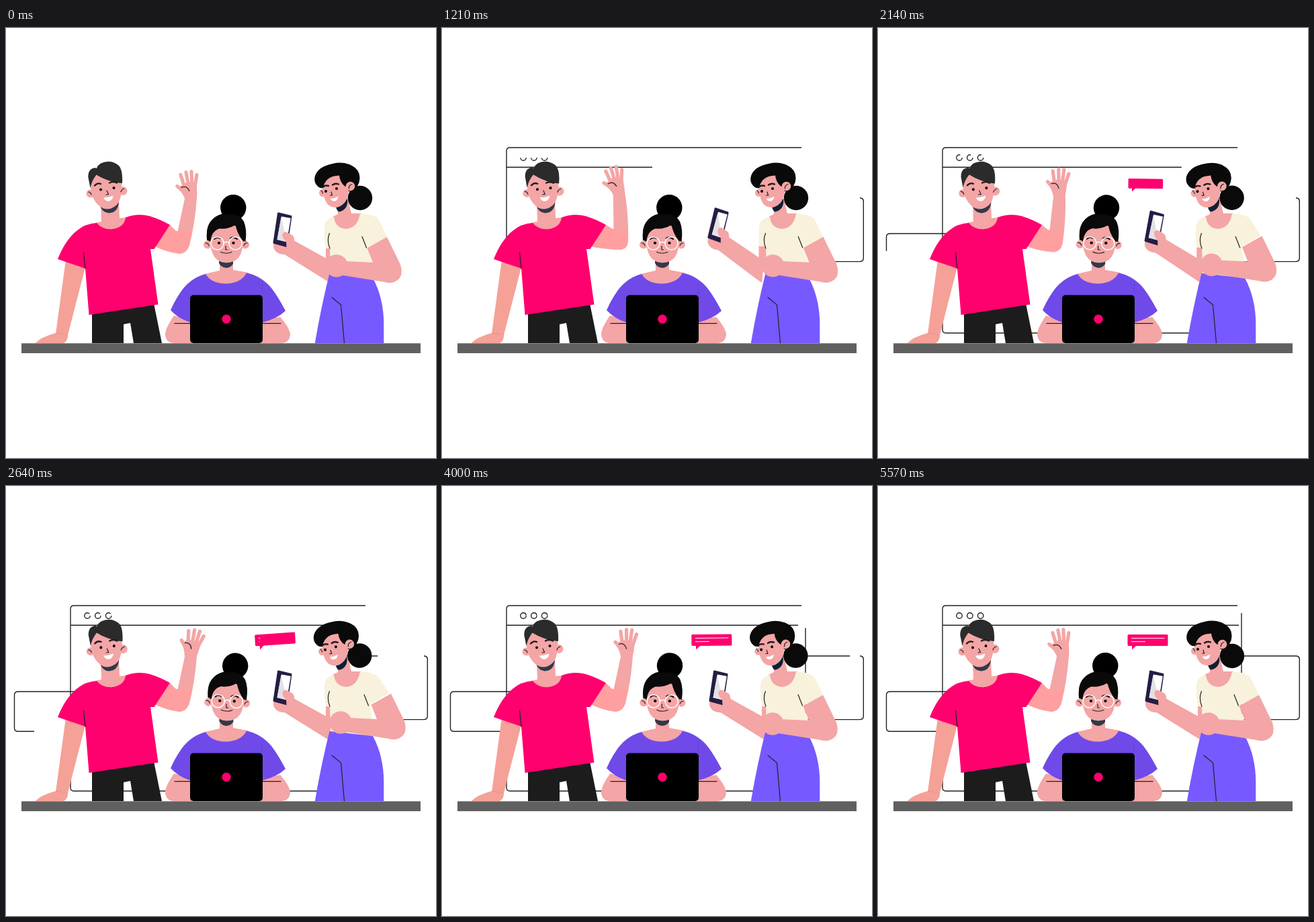
These frames come from a looping animation (640 px wide and 640 px high, 6.07 s). An HTML page:

```html
<!DOCTYPE html>
<html lang="en">
<head>
<meta charset="utf-8">
<title>Team at a desk</title>
<style>
  html, body { margin: 0; height: 100%; overflow: hidden; background: #fff; }
  svg { display: block; width: 100%; height: 100%; }
  .skin { fill: #f4a5a5; }
  .warm { fill: #f5a197; }
  .bright { fill: #ff9f9f; }
  .ink { fill: #0a0a0a; }
  .shade { fill: #2e3a4a; }
  .line, .frame { fill: none; stroke: #222; stroke-width: 1.2; stroke-linecap: round; }
  .frame { stroke-width: 1.4; stroke-linecap: butt; }
  .brow { fill: none; stroke: #1d1d22; stroke-width: 2.4; stroke-linecap: round; }
  .finger { fill: none; stroke: #f4a5a5; stroke-width: 5.2; stroke-linecap: round; }
  .text { stroke: #fff; stroke-width: 1; }
</style>
</head>
<body>
<svg viewBox="0 0 640 640">
  <g class="frame">
    <path class="draw" pathLength="1" d="M535,178H101Q96,178 96,183V449Q96,454 101,454H536Q541,454 541,449V189"/>
    <path class="draw" pathLength="1" d="M96,207.3H537"/>
    <circle class="draw" pathLength="1" cx="121" cy="193" r="4.2"/>
    <circle class="draw" pathLength="1" cx="136.800" cy="193" r="4.2"/>
    <circle class="draw" pathLength="1" cx="152.600" cy="193" r="4.2"/>
    <path id="leftBox" d="M106,306H18Q12.500,306 12.500,311V360Q12.500,365.300 18,365.300H112"/>
    <path id="rightBox" pathLength="1" d="M622,253Q627.300,253 627.300,258V342Q627.300,347.600 622,347.600H508Q503,347.600 503,342V258Q503,253 508,253H622"/>
  </g>

  <g id="bubble">
    <path fill="#ff006e" d="M373,221H430Q431.500,221 431.500,222.500V236.500Q431.500,238 430,238H384L378,243.500V238H373Q371.500,238 371.500,236.500V222.500Q371.500,221 373,221Z"/>
    <path id="text1" class="text"/>
    <path id="text2" class="text"/>
  </g>

  <!-- waving man -->
  <g id="forearm">
    <path class="skin" d="M-8,-18L-7,-74H10Q15,-40 13,0Q10,14 -2,14L-10,6Z"/>
    <g id="hand">
      <path class="skin" d="M-14,-16Q-8,-22 0,-21Q8,-20 9,-14Q10,-5 9,5L-8,5Q-12,-6 -21,-13Z"/>
      <path class="finger" d="M9,-32L6,-13M1,-37L2,-14M-7,-36L-3,-14M-15,-32L-9,-13M-20,-15L-8,-5"/>
      <path class="line" d="M-14,-13Q-6,-17 -2,-8"/>
    </g>
  </g>
  <path id="upperArm" class="bright"/>
  <path class="warm" d="M89,345L74,455L92,457L118,356Z"/>
  <path class="warm" d="M44,468.500Q52,460 74,454L92,457Q92.500,465 86,469H45Z"/>
  <path fill="none" stroke="#e08d88" stroke-width=".7" d="M74,454L92,457"/>
  <path fill="#1c1c1c" d="M128,422V469H175V441L185,439L190,469H232L220,410Z"/>
  <path class="skin" d="M141,262L142,288L133,290Q138,302 156,301Q174,300 180,282L169,283L168,258Z"/>
  <path fill="#ff006e" d="M135,290Q118,291 105,302Q88,316 77,344L118,358L123.500,427L226.500,411.500L215,329H220.500L244,293Q230,285 214,280Q196,275 178,282Q176,298 156,299.500Q142,299.500 135,290Z"/>
  <path class="line" d="M115.500,334L118,358"/>
  <g id="manHead">
    <path class="shade" d="M139,262L168,258Q167,275 153,275.500Q143,275 139,262Z"/>
    <circle class="skin" cx="125.500" cy="246.500" r="6"/>
    <circle class="skin" cx="174" cy="242.500" r="6.500"/>
    <path class="skin" d="M125,232Q130,215 150,216L172,224Q174,255 164,264Q152,274 140,266Q130,258 127,245Z"/>
    <path class="line" d="M122.500,244Q126,244 127,248M171,244Q172,240 176,239"/>
    <path fill="#2b2b2b" d="M125.500,238L122.300,222Q122,209 133,208L137,211L135,218Q128,226 125.500,238ZM134.500,218.500Q132,207 141,201.500Q155,195 167,204Q174,210 173,231Q160,230 150,226Q142,223 134.500,218.500Z"/>
    <path class="brow" d="M132,234.500Q136,230 141,232M154,230.500Q159,227.500 165,230.500"/>
    <ellipse class="eye a" cx="141" cy="240.500" rx="2"/>
    <ellipse class="eye a" cx="160.500" cy="238" rx="2"/>
    <path class="line" d="M150,242L152.500,247.500L149,248"/>
    <path fill="#fff" d="M145,252.500Q152,252.500 159.500,249.500Q159,257 152,258Q147,257.500 145,252.500Z"/>
  </g>

  <!-- woman with the laptop -->
  <path class="skin" d="M250,428Q237,447 237,456Q238,469 251,469H277V435Z"/>
  <path class="skin" d="M408,430Q422,446 423,456Q422,469 409,469H379V435Z"/>
  <path class="line" d="M251,439.700H275M381,439.700H409"/>
  <path class="skin" d="M318,340V361L296,366Q304,382 327,382Q351,382 360,364L338,360V340Z"/>
  <path fill="#704ae8" d="M297,366Q272,373 258,396Q251,406 245,420Q257,433 274,438H382Q403,433 416,421Q405,400 395,387Q380,369 358,364.500Q350,380 327,380.500Q305,380 297,366Z"/>
  <path fill="none" stroke="#6440d6" d="M381.500,379V398"/>
  <rect x="274" y="397.500" width="108" height="71.500" rx="5"/>
  <circle cx="328" cy="433.300" r="6.700" fill="#ff006e"/>
  <g id="midHead">
    <path class="shade" d="M317,343H338V351Q334,357 327.500,357Q320,356 317,350Z"/>
    <circle class="ink" cx="328" cy="305" r="29"/>
    <circle cx="338.300" cy="267.300" r="19.200"/>
    <circle class="skin" cx="300" cy="322.500" r="6"/>
    <circle class="skin" cx="356" cy="322.500" r="6"/>
    <path class="skin" d="M304,314Q304,292 328,292Q352,292 352.500,314Q354,349 328,349.500Q304,349 304,314Z"/>
    <path class="ink" d="M299,316Q296,286 318,279Q345,272 354,288Q359,300 356.500,318L352,316Q344,306 341.500,293Q330,300 318,298.500Q306,302 304.500,317Z"/>
    <path class="line" d="M297,320Q301,320 302,324M354,324Q355,320 359,320"/>
    <path class="brow" d="M310,314Q314,310 319,313M334,313Q339,310 344,314" stroke-width="2"/>
    <g fill="none" stroke="#fff" stroke-width="1.500">
      <circle cx="314.500" cy="320.500" r="9.600"/>
      <circle cx="341.500" cy="320.500" r="9.600"/>
      <path d="M324,320Q328,317 332,320"/>
    </g>
    <ellipse class="eye a" cx="317" cy="320" rx="2.200"/>
    <ellipse class="eye a" cx="338.500" cy="320" rx="2.200"/>
    <path class="line" d="M327,324.500V330H329.500M319.500,333.500Q328,337 336,333.500"/>
  </g>

  <!-- woman with the phone -->
  <path id="sleeveSkin" class="skin"/>
  <g id="phoneArm">
    <path class="skin" d="M428,316L484,347V380L477,376L408,333Z"/>
    <ellipse class="skin" cx="413" cy="324" rx="15" ry="13"/>
    <path fill="#241d45" stroke="#241d45" stroke-width="3" stroke-linejoin="round" d="M405.500,276L424,280.500L417.500,324.500L399,319.500Z"/>
    <path fill="#fff" d="M410,280.500L423.800,283L418,318.500L403.500,315Z"/>
    <path fill="#e3e1e4" d="M409.500,281L418,318.500L403.500,315Z"/>
    <path class="skin" d="M411.500,307Q414,301 420,305L427,309Q431,314 428,325L418,334L417,318Q411,313 411.500,307Z"/>
  </g>
  <path class="skin" d="M493,264L494,277L486,281Q488,301 507,301Q526,299 529,276L514,276L509,255Z"/>
  <path id="top" fill="#f8f1dc"/>
  <path class="line" d="M481.500,305.500Q477,316 482,328"/>
  <path id="fold" class="line" d="M530,310.500L536.500,327"/>
  <path fill="#7759ff" d="M481.500,365L546,372Q562,402 562.300,440V469H459.800Q469,415 481.500,365Z"/>
  <path class="line" d="M485,401L498.500,412L503.500,469"/>
  <g id="elbow" class="skin">
    <path d="M537.500,327.500L567,311L587,352Q593,372 578,378Q571,380.500 563,378L500,368L500,347L546,349Z"/>
    <circle cx="492" cy="354" r="16.700"/>
  </g>
  <g id="rightHead">
    <circle class="ink" cx="527" cy="253" r="18.200"/>
    <path fill="#0d2035" d="M490,262L508,254Q510,270 496,273.500Q492,273 490,262Z"/>
    <path class="ink" d="M466,237Q457,231 460,220Q465,206 486,202Q502,198 515,205Q527,211 526.500,224Q526,236 515,242L500,246Z"/>
    <circle class="skin" cx="471.500" cy="245.500" r="5.500"/>
    <path class="skin" d="M472,240Q473,222 496,218L509,232Q512,250 504,260Q494,271 482,265Q473,259 472,240Z"/>
    <path class="ink" d="M463,234Q460,218 478,212L504,210L517,228L505,236Q497,230 496,219.500Q482,221 474,224Q471,229 472,238Q466,239 463,234Z"/>
    <circle class="skin" cx="512.500" cy="235.500" r="6.800"/>
    <path class="line" d="M510.500,239Q510,234 515,232.500M469,242Q471,243 471.500,246"/>
    <path class="brow" d="M472,236.500Q475,233.500 480,235M486,233.500Q490,230.500 495,232.500"/>
    <ellipse class="eye b" cx="476" cy="243" rx="2"/>
    <ellipse class="eye b" cx="492" cy="239" rx="2"/>
    <path class="line" d="M484,244L485.500,249H482.500"/>
    <path fill="#fff" d="M482.500,254Q489,254 494.500,250.500Q494,257 488.500,258Q484,257.500 482.500,254Z"/>
  </g>

  <rect x="23" y="469.300" width="594" height="14.700" fill="#606060"/>
</svg>
<script>
const LOOP = 6070;
const $ = id => document.getElementById(id);
const all = selector => document.querySelectorAll(selector);
const clamp = v => Math.min(1, Math.max(0, v));
const smooth = v => v * v * (3 - 2 * v);
const set = (id, name, value) => $(id).setAttribute(name, value);

// Strong ease-out curve: cubic-bezier(.31, 0, .01, 1)
function ease(x) {
  let low = 0, high = 1;
  for (let i = 0; i < 20; i++) {
    const s = (low + high) / 2, r = 1 - s;
    if (3 * r * r * s * .31 + 3 * r * s * s * .01 + s ** 3 < x) low = s; else high = s;
  }
  return smooth(high);
}
const drawn = (t, start, end) => t <= start ? 0 : t >= end ? 1 : ease((t - start) / (end - start));

// Eased value between [time, value] keys
function keyed(t, ...keys) {
  const i = keys.findIndex(k => k[0] > t);
  if (i < 0) return keys.at(-1)[1];
  if (i === 0) return keys[0][1];
  const [t0, v0] = keys[i - 1], [t1, v1] = keys[i];
  return v0 + (v1 - v0) * smooth((t - t0) / (t1 - t0));
}

function drawFrames(t) {
  const p = drawn(t, 0, 5000);
  all('.draw').forEach(el => el.setAttribute('stroke-dasharray', `${p} 2`));
  set('leftBox', 'stroke-dasharray', `${Math.max(0, 770 * p - 504)} 999`);
  set('leftBox', 'visibility', 770 * p > 504 ? 'visible' : 'hidden');
  set('rightBox', 'stroke-dasharray', `${drawn(t, 100, 5570)} 2`);
}

function drawBubble(t) {
  const scale = smooth(clamp((t - 1530) / 800));
  const turn = keyed(t, [1530, 18], [2400, -4], [2640, -3.8], [3430, -2], [4500, .5], [5140, 0]);
  set('bubble', 'transform', `translate(378 243) rotate(${turn}) scale(${scale}) translate(-378 -243)`);
  const line = smooth(clamp((t - 2540) / 750));
  set('text1', 'd', `M377,226.500h${49.500 * line}`);
  set('text2', 'd', `M377,231.700h${21 * line}`);
}

function drawMan(t) {
  const arm = keyed(t, [0, 11], [790, 0], [1640, -4], [2500, 11]);
  const hand = keyed(t, [0, 0], [790, -7], [1640, -7], [2500, 20], [3430, 20], [4570, 1], [5140, 0]);
  const a = (11 - arm) / 11;
  set('forearm', 'transform', `translate(${260 + 3.5 * a} ${322 - 5 * a}) rotate(${arm})`);
  set('hand', 'transform', `translate(1 -73) rotate(${hand - arm})`);
  set('upperArm', 'd', `M244,293L253,${302 - 3 * a}L${277 - a},${303 - a}L${272 + 4 * a},${325 - 4 * a}
    Q${268 + 6 * a},${336 - 5 * a} ${258 + 4 * a},${336 - 5 * a}Q240,${334 - 4 * a} 221,325L215,320Z`);
  const tilt = keyed(t, [0, 0], [790, .7], [1640, 1.8], [2640, .4], [3430, 0]);
  set('manHead', 'transform', `rotate(${tilt} 152 285)`);
}

function drawWomen(t) {
  const mid = keyed(t, [0, 0], [1500, 0], [2640, 1.8], [3430, .9], [4570, 0]);
  set('midHead', 'transform', `rotate(${mid} 328 360)`);
  const right = keyed(t, [0, 0], [1640, 0], [2640, -1.5], [3430, -2.5], [4570, 0]);
  set('rightHead', 'transform', `rotate(${right} 505 280)`);

  const s = keyed(t, [0, 0], [790, 1], [1640, 1], [2500, 0]);
  const e = keyed(t, [0, 0], [1000, 0], [1640, .3], [2500, 1], [2640, 1], [3430, 0]);
  set('phoneArm', 'transform', `translate(${-6 * s} ${-s}) rotate(${5 * s} 480 360)`);
  set('elbow', 'transform', `translate(${6 * e} ${-2 * e})`);
  set('fold', 'transform', `translate(${3 * e} 0)`);
  const hemX = 476 - 4.5 * s, hemY = 328 - 3 * s;
  set('sleeveSkin', 'd', `M${hemX},${hemY - 2}H486V380L${hemX},${hemY + 17}Z`);
  set('top', 'd', `M488,281Q${475 - 2 * s},284 ${474 - 2 * s},296Q${473 - 2 * s},310 ${hemX},${hemY}
    H482L483,367L546,372L545,349L${538 + 4 * e},${327 - 2 * e}L${567 + 3 * e},${311 - 3 * e}L554,284
    Q545,276 527,276.500Q523,298 506,299Q490,298 488,281Z`);
}

function blink(t) {
  for (const [name, at] of [['.a', 790], ['.b', 1640]]) {
    const open = clamp(Math.abs(t - at) / 180);
    all('.eye' + name).forEach(el => el.setAttribute('ry', .5 + 1.6 * open));
  }
}

function render(now) {
  const t = Math.max(0, now) % LOOP;
  drawFrames(t);
  drawBubble(t);
  drawMan(t);
  drawWomen(t);
  blink(t);
}

const begin = performance.now();
render(0);
requestAnimationFrame(function tick(now) {
  render(now - begin);
  requestAnimationFrame(tick);
});
</script>
</body>
</html>
```
